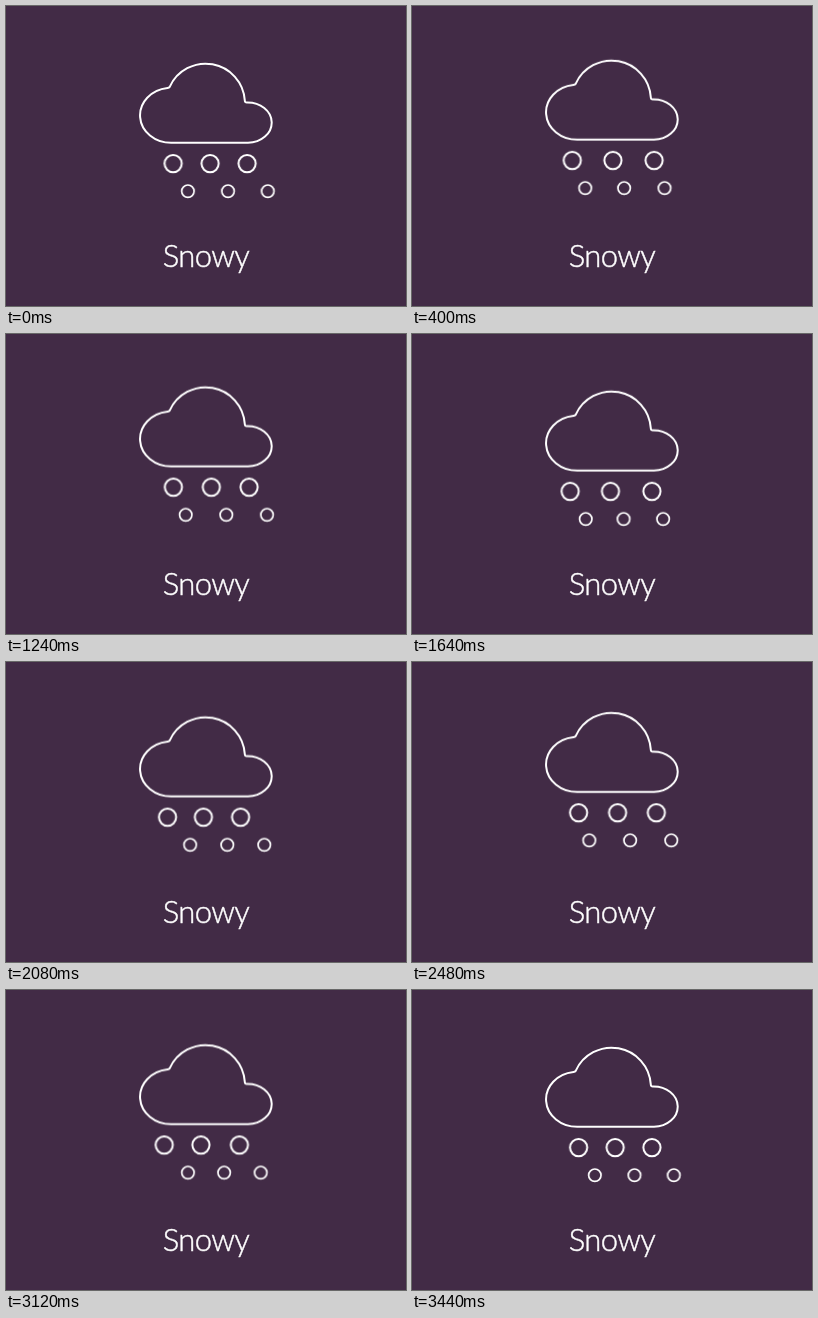
These frames come from a looping animation (400 by 300 pixels, 3.48 s). An HTML page:

```html
<!DOCTYPE html>
<html lang="en">
<head>
<meta charset="utf-8">
<title>Snowy</title>
<style>
  html, body { margin: 0; width: 100%; height: 100%; overflow: hidden; background: #422b46; }
  svg { display: block; width: 400px; height: 300px; }
  .icon { fill: none; stroke: #fff; stroke-width: 2; stroke-linejoin: round; }
  .small { stroke-width: 1.7; }
  .icon, circle {
    animation: bob 870ms cubic-bezier(.364, 0, .636, 1) infinite alternate;
  }
  circle {
    animation-name: sway;
    animation-duration: 580ms;
    animation-delay: calc(var(--i) * 80ms - 1340ms);
  }
  @keyframes bob  { from { transform: translateY(0); }     to { transform: translateY(-7.2px); } }
  @keyframes sway { from { transform: translateX(5.6px); } to { transform: translateX(-5.6px); } }
  text {
    font: 300 31px Lato, "Open Sans", sans-serif; letter-spacing: -.6px;
    fill: #fff; stroke: #fff; stroke-width: .5; text-anchor: middle;
  }
</style>
</head>
<body>
<svg viewBox="0 0 400 300">
  <g class="icon">
    <path d="M165.5 136.8A31.2 27.5 0 0 1 161.5 82Q163.1 81.8 163.7 80.9A39.3 39.2 0 0 1 238.8 94.4Q238.7 96.5 241 96.4A24.2 20.2 0 0 1 242 136.8Z"/>
    <g class="small">
      <circle style="--i:0" cx="178.8" cy="185.2" r="6.2"/>
      <circle style="--i:1" cx="217.2" cy="185.2" r="6.2"/>
      <circle style="--i:2" cx="256.2" cy="185.2" r="6.2"/>
    </g>
    <circle style="--i:3" cx="161.8" cy="157.6" r="8.6"/>
    <circle style="--i:4" cx="200" cy="157.6" r="8.6"/>
    <circle style="--i:5" cx="239" cy="157.6" r="8.6"/>
  </g>
  <text x="200" y="260.5">Snowy</text>
</svg>
</body>
</html>
```
